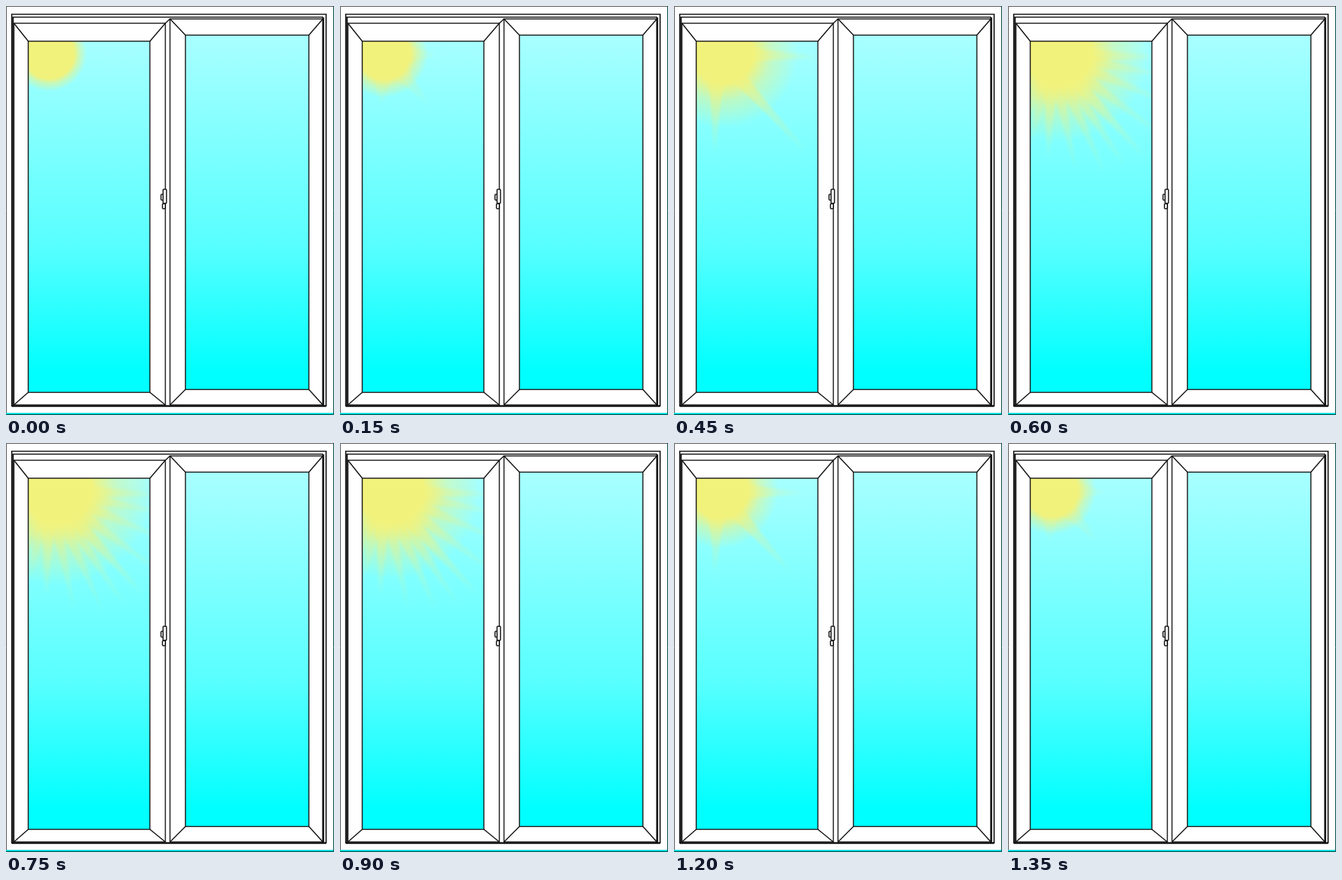
Recreate the animation shown at these times as an HTML page with a canvas. Size 457 px wide and 569 px high, loop 1500 ms.

```html
<!DOCTYPE html>
<html>
<head>
<meta charset="utf-8">
<style>
html, body { margin: 0; width: 100%; height: 100%; overflow: hidden; background: #fff; }
canvas { display: block; }
</style>
</head>
<body>
<canvas id="stage" width="457" height="569"></canvas>
<script>
const ctx = document.getElementById('stage').getContext('2d');
const STEP = 150, PEAK = 5;
const SUN = { x: 60, y: 66 };
const RAYS = 11;
const leftPane = { x: 31, y: 49, w: 169.5, h: 488.5 };
const rightPane = { x: 250, y: 40.5, w: 172, h: 493 };
const leftSash = { x: 11, y: 24, w: 211, h: 531 };
const rightSash = { x: 228.5, y: 18, w: 213, h: 537 };

const yellow = a => `rgba(241,242,124,${a})`;
const easeOut = k => 1 - (1 - k) ** 3;
const smooth = k => k * k * (3 - 2 * k);

function line(width, ...p) {
  ctx.lineWidth = width;
  ctx.beginPath();
  for (let i = 0; i < p.length; i += 2) ctx.lineTo(p[i], p[i + 1]);
  ctx.stroke();
}

function sky({ x, y, w, h }) {
  const g = ctx.createLinearGradient(0, 40, 0, 510);
  g.addColorStop(0, '#a9ffff');
  g.addColorStop(.63, '#57ffff');
  g.addColorStop(1, '#00ffff');
  ctx.fillStyle = g;
  ctx.fillRect(x, y, w, h);
}

function ray(angle, length, half, alpha) {
  const base = 30;
  if (length <= base) return;
  ctx.save();
  ctx.translate(SUN.x, SUN.y);
  ctx.rotate(angle);
  const g = ctx.createLinearGradient(base, 0, length, 0);
  g.addColorStop(0, yellow(alpha));
  g.addColorStop(.5, yellow(alpha * .4));
  g.addColorStop(1, yellow(0));
  ctx.fillStyle = g;
  ctx.beginPath();
  ctx.moveTo(base, -half);
  ctx.quadraticCurveTo(base + 25, -half / 2.5, length, -3);
  ctx.lineTo(length, 3);
  ctx.quadraticCurveTo(base + 25, half / 2.5, base, half);
  ctx.fill();
  ctx.restore();
}

// Every fourth ray grows from the start; the rest of the fan joins near the peak.
function rays(k) {
  const grow = easeOut(k);
  for (let i = 0; i < RAYS; i++) {
    const main = i % 4 === 0;
    if (!main && k < .7) continue;
    const angle = (2 + i * 11 + 2 * Math.sin(i * 5)) * Math.PI / 180;
    const reach = 150 + 45 * Math.sin(2 * angle);
    ray(angle, reach * grow, main ? 14 : 12, (main ? .8 : .6) * grow);
  }
}

function glow(k) {
  const s = smooth(k);
  const x = SUN.x + 12 * s, y = SUN.y - 2 * s;
  const core = 35 + 12 * s, edge = 53 + 80 * s;
  const solid = core / edge;
  const g = ctx.createRadialGradient(x, y, 0, x, y, edge);
  g.addColorStop(solid, yellow(1));
  g.addColorStop(solid + (1 - solid) * .4, yellow(.5 - .1 * s));
  g.addColorStop(1, yellow(0));
  ctx.fillStyle = g;
  ctx.fillRect(0, 0, 250, 250);
}

function sun(k) {
  const { x, y, w, h } = leftPane;
  ctx.save();
  ctx.beginPath();
  ctx.rect(x, y, w, h);
  ctx.clip();
  ctx.filter = 'blur(1.5px)';
  rays(k);
  ctx.filter = 'none';
  glow(k);
  ctx.restore();
}

// Pane outline with mitre lines to the corners of its sash
function sash(outer, pane) {
  ctx.lineWidth = 1.4;
  ctx.strokeRect(pane.x, pane.y, pane.w, pane.h);
  ctx.strokeRect(outer.x, outer.y, outer.w, outer.h);
  for (const i of [0, 1]) for (const j of [0, 1])
    line(1.5, outer.x + i * outer.w, outer.y + j * outer.h, pane.x + i * pane.w, pane.y + j * pane.h);
}

function handlePart(x, y, w, h) {
  ctx.beginPath();
  ctx.roundRect(x, y, w, h, 1);
  ctx.lineWidth = 1.5;
  ctx.fill();
  ctx.stroke();
}

function frame() {
  // Stage edges
  ctx.strokeStyle = '#555';
  line(1, .5, 569, .5, .5, 457, .5);
  ctx.fillStyle = '#0dd';
  ctx.fillRect(0, 566, 457, 2);
  ctx.strokeStyle = '#044';
  line(1, 456.5, 0, 456.5, 568.5, 0, 568.5);

  ctx.strokeStyle = '#111';
  line(1.6, 8, 557, 8, 11.5, 446, 11.5, 446, 557);
  line(1.6, 9, 15.5, 442, 15.5);
  line(2.5, 8, 556.5, 446, 556.5);
  line(2.6, 442, 16, 442, 557);
  line(2, 9.7, 15, 9.7, 556);
  sash(leftSash, leftPane);
  sash(rightSash, rightPane);
  line(1.5, 222, 24, 228.5, 18);

  ctx.fillStyle = '#fff';
  handlePart(216, 262, 3, 8);
  handlePart(218, 275, 4, 7);
  handlePart(218.8, 255, 4.8, 19.5);
}

function draw(now) {
  const step = Math.floor(now / STEP) % (2 * PEAK);
  ctx.fillStyle = '#fff';
  ctx.fillRect(0, 0, 457, 569);
  sky(leftPane);
  sky(rightPane);
  sun(Math.min(step, 2 * PEAK - step) / PEAK);
  frame();
}

const start = performance.now();
function tick() {
  draw(performance.now() - start);
  requestAnimationFrame(tick);
}
tick();
</script>
</body>
</html>
```
